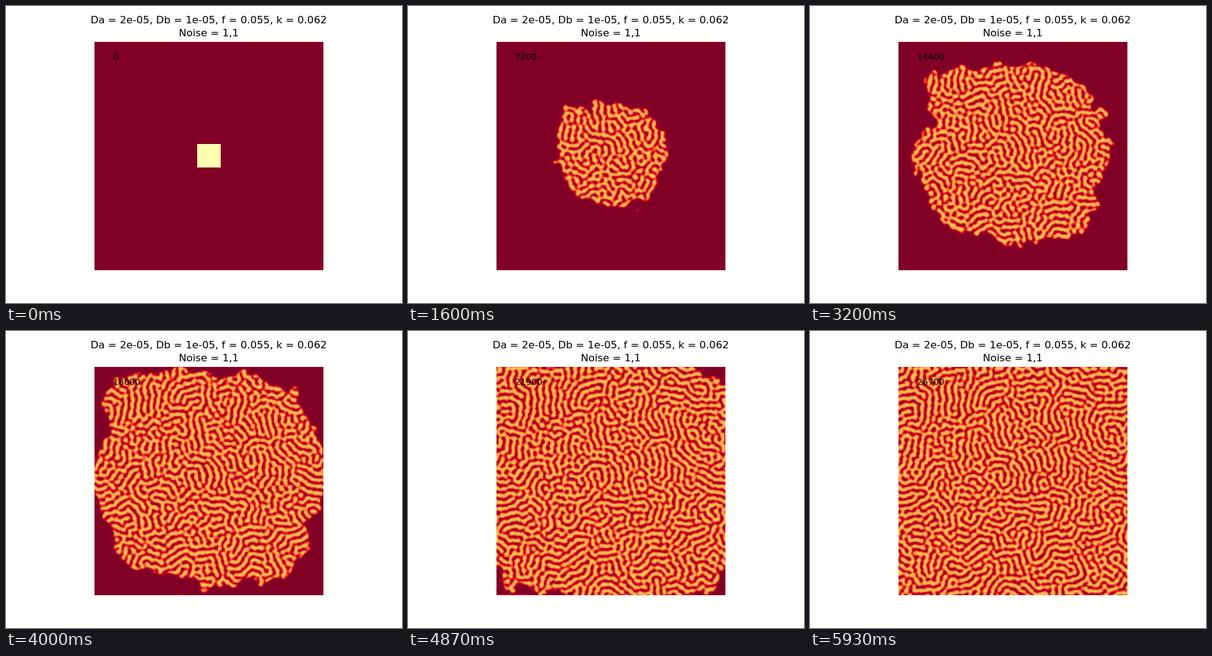
Animation of 640 by 480 pixels, one loop 6000 ms. Source, as an HTML page with a canvas:

```html
<!DOCTYPE html>
<html lang="en">
<head>
<meta charset="utf-8">
<title>Reaction diffusion</title>
<style>
html, body { margin: 0; width: 100%; height: 100%; overflow: hidden; background: #fefefd; }
canvas { position: absolute; left: 143px; top: 58px; }
svg { position: absolute; left: 0; top: 0; }
text { font-family: "DejaVu Sans", sans-serif; font-size: 16.6px; fill: #000; }
#count { font-size: 13.89px; }
</style>
</head>
<body>
<canvas id="plot" width="370" height="369"></canvas>
<svg width="640" height="480">
  <text x="327.6" y="28" text-anchor="middle">Da = 2e-05, Db = 1e-05, f = 0.055, k = 0.062</text>
  <text x="327.6" y="49" text-anchor="middle">Noise = 1,1</text>
  <text id="count" x="173" y="87">0</text>
</svg>
<script>
const N = 256, CELLS = N * N, WRAP = N - 1;
const WIDTH = 370, HEIGHT = 369, CELL = WIDTH / N;
const FRAMES = 90, LOOP = 6000, STEP = LOOP / FRAMES;
const INNER = 1.12, OUTER = 2.2; // blur radii that set the stripe spacing
const GAIN = 5, JITTER = 3.6;    // jitter keeps the stripes short and restless

// Front speed by direction, clockwise from the right
const REACH = [1.01, .95, 1.06, .96, .9, .88, 1.03, .95,
               1.02, .95, 1.18, 1, .94, .97, 1.05, 1.02];

// position, red, green, blue
const STOPS = [
  [0, 128, 0, 38], [.19, 189, 0, 38], [.37, 227, 26, 28],
  [.56, 252, 78, 42], [.75, 253, 141, 60], [.94, 254, 178, 76], [1, 254, 190, 86]
];

const ctx = document.getElementById('plot').getContext('2d');
const count = document.getElementById('count');
const mix = (a, b, t) => a + (b - a) * t;

let seed = 20;
function random() {
  seed = (seed + 0x6D2B79F5) | 0;
  let t = Math.imul(seed ^ (seed >>> 15), 1 | seed);
  t = (t + Math.imul(t ^ (t >>> 7), 61 | t)) ^ t;
  return ((t ^ (t >>> 14)) >>> 0) / 4294967296;
}
const noise = () => random() - .5;

const palette = Array.from({ length: 256 }, (_, i) => {
  const t = i / 255;
  const k = Math.max(1, STOPS.findIndex(s => s[0] >= t));
  const a = STOPS[k - 1], b = STOPS[k];
  const f = (t - a[0]) / (b[0] - a[0]);
  const [r, g, bl] = [1, 2, 3].map(c => Math.round(mix(a[c], b[c], f)));
  return (255 << 24 | bl << 16 | g << 8 | r) >>> 0;
});

// Separable Gaussian blur on a wrapping grid
function blur(src, sigma) {
  const r = Math.round(sigma * 2.5);
  const kernel = [];
  let sum = 0;
  for (let i = -r; i <= r; i++) {
    const w = Math.exp(-i * i / (2 * sigma * sigma));
    kernel.push(w);
    sum += w;
  }
  const rows = new Float32Array(CELLS), out = new Float32Array(CELLS);
  for (let y = 0; y < N; y++) {
    for (let x = 0; x < N; x++) {
      let v = 0;
      for (let i = -r; i <= r; i++) v += kernel[i + r] * src[y * N + ((x + i) & WRAP)];
      rows[y * N + x] = v / sum;
    }
  }
  for (let y = 0; y < N; y++) {
    for (let i = -r; i <= r; i++) {
      const w = kernel[i + r] / sum, from = ((y + i) & WRAP) * N;
      for (let x = 0; x < N; x++) out[y * N + x] += w * rows[from + x];
    }
  }
  return out;
}

// One step of short-range activation and long-range inhibition
function react(src, keep, jitter) {
  const near = blur(src, INNER), far = blur(src, OUTER);
  return near.map((v, i) =>
    Math.tanh(GAIN * (v - far[i]) + keep * src[i] + jitter * noise()));
}

function reachAt(angle) {
  const p = (angle / (2 * Math.PI) * 16 + 16) % 16;
  const k = Math.floor(p), f = p - k;
  return mix(REACH[k % 16], REACH[(k + 1) % 16], f * f * (3 - 2 * f));
}

const dist = new Float32Array(CELLS);
const reach = new Float32Array(CELLS);
const square = new Float32Array(CELLS);
for (let i = 0; i < CELLS; i++) {
  const x = ((i % N) + .5 - N / 2) * CELL;
  const y = (Math.floor(i / N) + .5 - N / 2) * CELL;
  dist[i] = Math.hypot(x, y);
  reach[i] = reachAt(Math.atan2(y, x));
  square[i] = dist[i] / Math.max(Math.abs(x), Math.abs(y));
}
const rough = blur(new Float32Array(CELLS).map(noise), 4).map(v => v * 240);

let field = new Float32Array(CELLS).map(noise);
for (let i = 0; i < 14; i++) field = react(field, 0, JITTER);

// Cut the field at the growing front and round off the loose ends
function render(n) {
  const radius = 20 + 2.8 * n;
  const shape = Math.min(1, n / 20), ragged = Math.min(1, n / 12);
  const inside = i =>
    dist[i] + rough[i] * ragged < radius * mix(square[i], reach[i], shape);
  const cut = v => v.map((value, i) => inside(i) ? value : -1);
  const soft = blur(cut(react(cut(field), .4, 0)), INNER * .8);
  return Uint8Array.from(soft, v => {
    const grain = v > -.97 ? noise() * .2 : 0;
    return Math.max(0, Math.min(255, (v + 1 + grain) / 1.65 * 255));
  });
}

const pictures = [null];
function picture(n) {
  while (pictures.length <= n) {
    field = react(field, 0, JITTER);
    pictures.push(render(pictures.length));
  }
  return pictures[n];
}

const grid = document.createElement('canvas');
grid.width = grid.height = N;
const gridCtx = grid.getContext('2d');
const image = gridCtx.createImageData(N, N);
const pixels = new Uint32Array(image.data.buffer);

function draw(n) {
  count.textContent = n * 300;
  if (n === 0) {
    ctx.fillStyle = '#800026';
    ctx.fillRect(0, 0, WIDTH, HEIGHT);
    ctx.fillStyle = '#ffffb2';
    ctx.fillRect(166, 165, 38, 38);
    return;
  }
  const levels = picture(n);
  for (let i = 0; i < CELLS; i++) pixels[i] = palette[levels[i]];
  gridCtx.putImageData(image, 0, 0);
  ctx.drawImage(grid, 0, 0, WIDTH, HEIGHT);
}

let shown = 0;
draw(0);
const start = performance.now();
function tick() {
  const t = (performance.now() - start) % LOOP;
  // steps fall on whole hundredths of a second
  const n = Math.floor((Math.floor(t / 10) * 10 + 5) / STEP) % FRAMES;
  if (n !== shown) draw(shown = n);
  requestAnimationFrame(tick);
}
requestAnimationFrame(tick);
</script>
</body>
</html>
```
